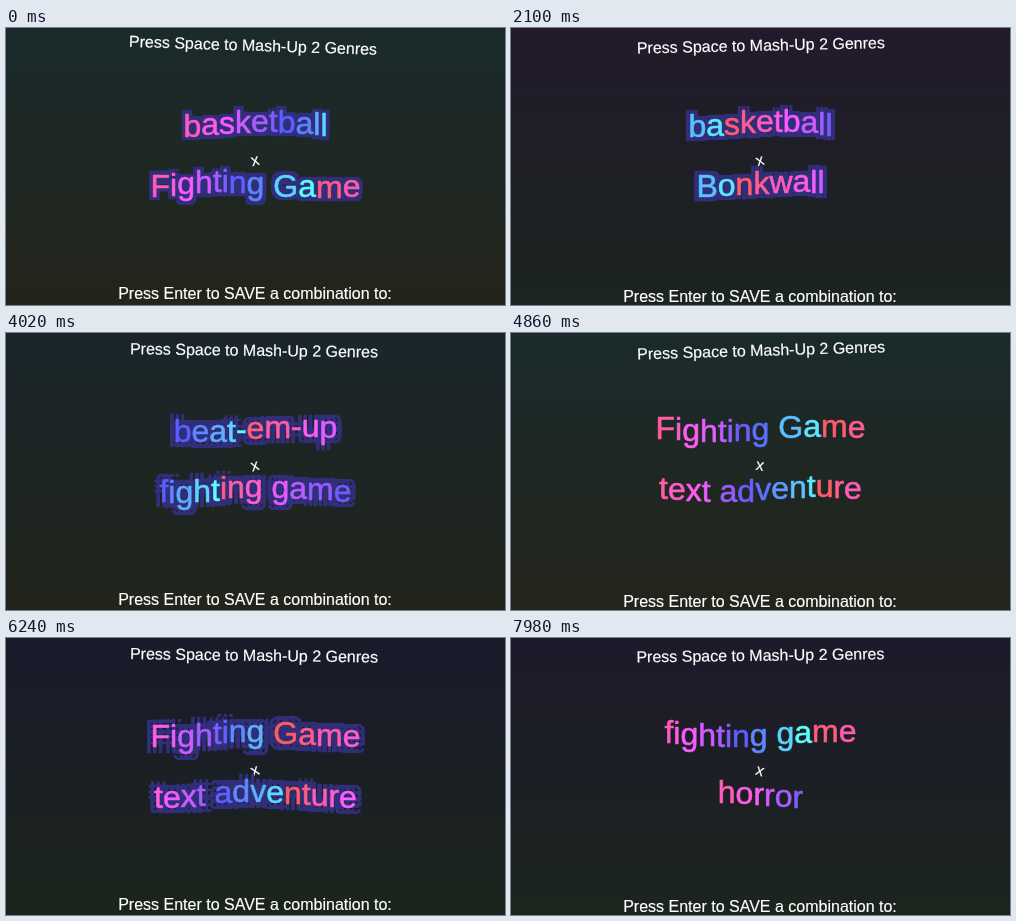
Animation, 499 px wide and 277 px high, one loop 8000 ms. Source, as an HTML page with a canvas:

```html
<!DOCTYPE html>
<html lang="en">
<head>
<meta charset="utf-8">
<title>Genre mash-up</title>
<style>
  html, body { margin: 0; width: 100%; height: 100%; overflow: hidden; background: #1b2024; }
  canvas { display: block; width: 499px; height: 277px; }
</style>
</head>
<body>
<canvas id="stage" width="499" height="277"></canvas>
<script>
const ctx = document.getElementById('stage').getContext('2d');
const W = 499, H = 277, LOOP = 8000, STEP = 30, TAU = Math.PI * 2;
const FONT = '"Liberation Sans", Arial, sans-serif';

const scenes = [
  [0, 'basketball', 'Fighting Game'],
  [1050, 'basketball', 'Bonkwall'],
  [2520, 'Fighting Game', 'text adventure'],
  [3480, 'beat-em-up', 'fighting game'],
  [4800, 'Fighting Game', 'text adventure'],
  [6330, 'rpg', 'Puzzle'],
  [7530, 'fighting game', 'horror']
];

// Cosine wave of time that peaks at `peak`.
const wave = (t, period, peak) => Math.cos(TAU * (t - peak) / period);

function drawBackground(t) {
  const hue = 225 + 43 * wave(t, 5000, 2230);
  const fill = ctx.createLinearGradient(0, 0, 0, H);
  fill.addColorStop(0, `hsl(${hue}, 25%, 13.5%)`);
  fill.addColorStop(1, `hsl(${hue - 115}, 15%, 12.5%)`);
  ctx.fillStyle = fill;
  ctx.fillRect(0, 0, W, H);
}

// A thin stroke in the fill colour gives the lettering its weight.
function inkText(text, x, y, color, weight) {
  ctx.fillStyle = ctx.strokeStyle = color;
  ctx.lineWidth = weight;
  ctx.lineJoin = 'round';
  ctx.strokeText(text, x, y);
  ctx.fillText(text, x, y);
}

function drawLabel(text, x, y, degrees, baseline) {
  ctx.save();
  ctx.translate(x, y);
  ctx.rotate(degrees * Math.PI / 180);
  ctx.font = `16px ${FONT}`;
  ctx.textAlign = 'center';
  inkText(text, 0, baseline, '#fff', 0.2);
  ctx.restore();
}

function layoutLetters(text, baseline, t) {
  let x = (W - ctx.measureText(text).width) / 2;
  return [...text].map((char, i) => {
    const letter = {
      char, x,
      y: baseline - 2.7 * Math.cos(TAU * (i / 12.6 - 0.365 + t / 1070)),
      hue: 180 + (1946 + 0.1128 * t - 14.5 * i) % 180
    };
    x += ctx.measureText(char).width;
    return letter;
  });
}

function drawGenre(text, baseline, t) {
  ctx.font = `32px ${FONT}`;
  ctx.textAlign = 'left';
  const letters = layoutLetters(text, baseline, t);
  const spread = 5.9 * wave(t, 1062, 905);

  // The outline is eight shifted copies, so a wide spread shows stripes.
  if (spread > 0) {
    for (const dx of [-1, 0, 1]) {
      for (const dy of [-1, 0, 1]) {
        if (!dx && !dy) continue;
        for (const { char, x, y } of letters) {
          inkText(char, x + dx * spread, y + dy * spread, '#322f7a', 0.6);
        }
      }
    }
  }
  for (const { char, x, y, hue } of letters) {
    inkText(char, x, y, `hsl(${hue}, 100%, 68%)`, 0.6);
  }
}

function draw(t) {
  const sway = wave(t, 3500, -122);
  const [, first, second] = scenes.findLast(([start]) => start <= t);

  drawBackground(t);
  drawLabel('Press Space to Mash-Up 2 Genres', 248.7 - 1.7 * sway, 17.3, 1.9 * sway, 5.5);
  drawGenre(first, 106.8, t);
  drawLabel('x', 249, 133, -20 * wave(t, 1070, 7347), 4.5);
  drawGenre(second, 167, t);
  drawLabel('Press Enter to SAVE a combination to:', 249, 272.8 - 1.9 * sway, 0, 0);
}

function tick() {
  const t = performance.now() % LOOP;
  draw(Math.floor(t / STEP) * STEP);
  requestAnimationFrame(tick);
}
tick();
</script>
</body>
</html>
```
